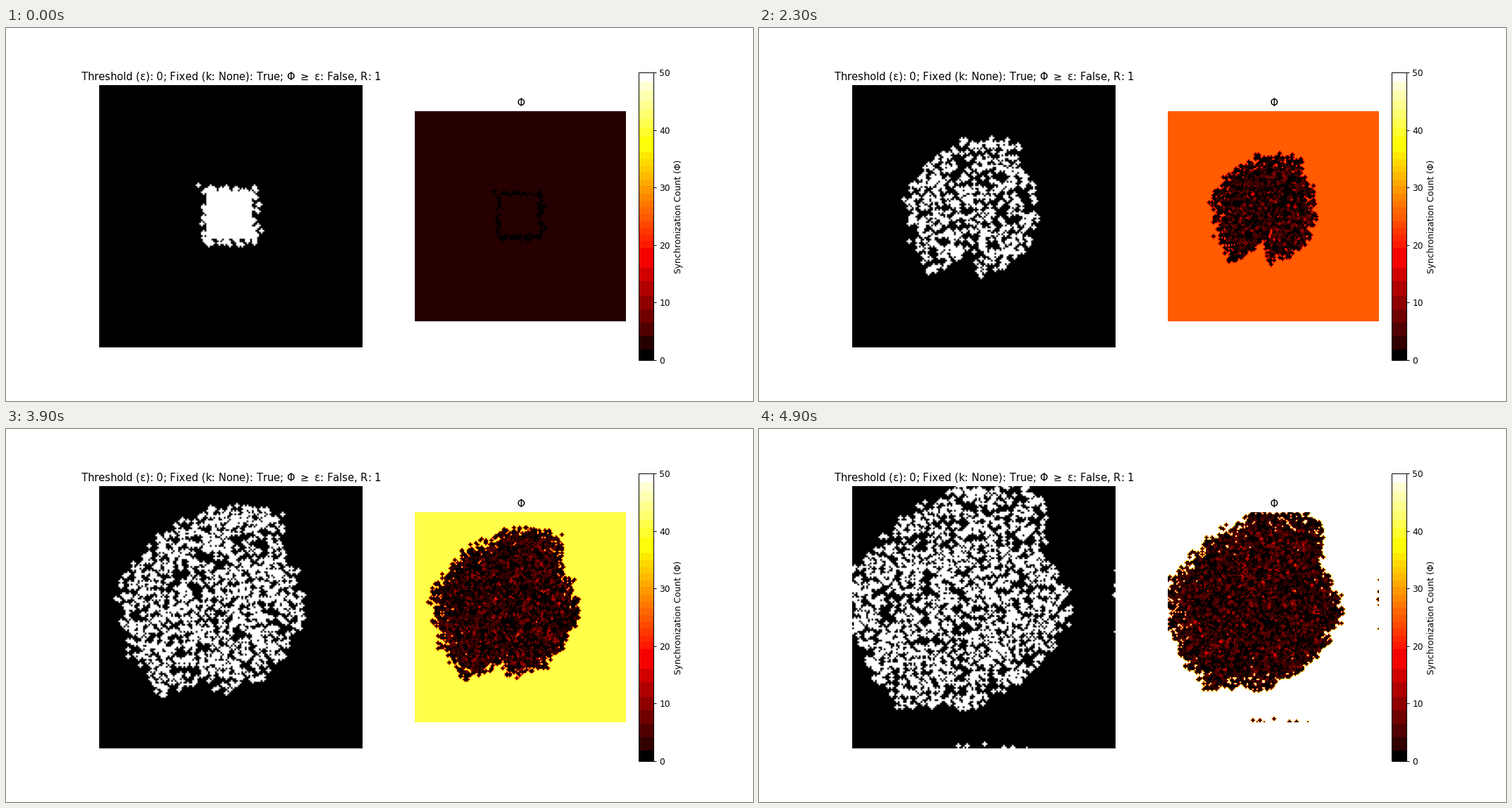
A matplotlib script for the animation above (5 s loop, 1058x529 px).

```python
import numpy as np
import matplotlib
import matplotlib.pyplot as plt
from matplotlib.animation import FuncAnimation
from matplotlib.colors import ListedColormap

FRAMES, N, VMAX = 50, 150, 50
SIZE = 372.7

# Growth speed of the colony by direction (degrees clockwise from right)
SPEED = {0: 1.6, 45: 1.0, 90: 1.7, 160: 2.8, 200: 3.1,
         225: 2.5, 270: 3.1, 295: 3.0, 315: 1.35, 340: 1.65}

axis = ((np.arange(N) + 0.5) / N - 0.5) * SIZE
X, Y = np.meshgrid(axis, axis)
HOT = matplotlib.colormaps["hot"](np.arange(256))[:, :3]


def radius(theta, n):
    """Outline: a square that grows, with ragged lobes and a closing notch."""
    a = np.radians(theta)
    base = 40 / np.maximum(abs(np.cos(a)), abs(np.sin(a)))
    grown = n * np.interp(theta, list(SPEED), list(SPEED.values()), period=360)
    lobes = sum(np.sin(k * a + k * k) for k in (11, 17, 26, 37))
    notch = 45 * np.sin(np.pi * n / FRAMES) * np.exp(-((theta - 113) / 11) ** 2)
    return base + grown + lobes * min(n / 8, 2) - notch


def colony(n, edge):
    """Cells the activity has reached, wrapping around the borders."""
    mask = np.zeros((N, N), bool)
    for sx, sy in ((0, 0), (SIZE, 0), (0, SIZE)):
        x, y = X - sx, Y - sy
        theta = np.degrees(np.arctan2(y, x)) % 360
        mask |= np.hypot(x, y) + edge < radius(theta, n)
    return mask


def plus(seeds):
    out = seeds.copy()
    for ax in (0, 1):
        for step in (-1, 1):
            out |= np.roll(seeds, step, ax)
    return out


def square(half):
    return np.maximum(abs(X + 2), abs(Y + 1)) < half


def background(n):
    """Count of the untouched cells, refreshed every second step."""
    return max(2, (n + 1) // 2 * 2 + 1)


def simulate():
    rng = np.random.default_rng(7)
    edge = rng.normal(0, 3, (N, N))
    state = square(37)
    last = np.full((N, N), -1)
    noise = rng.random((N, N))
    cells, counts = [], []
    for n in range(FRAMES):
        renew = rng.random((N, N)) < 0.42
        noise = np.where(renew, rng.random((N, N)), noise)
        density = 0.15 + 0.08 * np.exp(-n / 3)
        new = plus((noise < density) & colony(n, edge))
        new |= square(33 - 2.7 * n)
        last[new != state] = n
        state = new
        cells.append(state.astype(float))
        counts.append(np.where(last < 0, background(n), n - last).astype(float))
    return cells, counts


def palette(value):
    """Hot colormap in coarse colour steps, exact at the given value."""
    r, g, b = (HOT * 255).astype(int).T
    key = (r >> 5) * 256 + (g >> 4) * 16 + (b >> 5)
    lut = HOT.copy()
    for k in np.unique(key):
        lut[key == k] = HOT[key == k].mean(axis=0)
    i = min(int(value / VMAX * 256), 255)
    lut[key == key[i]] = HOT[i]
    lut[key == key[0]] = 0
    lut[key == key[-1]] = 1
    return ListedColormap(lut)


cells, counts = simulate()

plt.rcParams["font.family"] = "DejaVu Sans"
fig, (left, right) = plt.subplots(1, 2, figsize=(12, 6), dpi=1058 / 12)
world = left.imshow(cells[0], cmap="gray", vmin=0, vmax=1)
left.set_title(r"Threshold (ε): 0; Fixed (k: None): True; Φ $\geq$ ε: False, R: 1")
left.axis("off")

phi = right.imshow(counts[0], cmap=palette(background(0)), vmin=0, vmax=VMAX)
right.set_title("Φ")
right.axis("off")
fig.colorbar(phi, ax=right, label="Synchronization Count (Φ)")


def update(n):
    world.set_data(cells[n])
    phi.set_data(counts[n])
    phi.set_cmap(palette(background(n)))
    return world, phi


anim = FuncAnimation(fig, update, frames=FRAMES, interval=100,
                     repeat=True, repeat_delay=0, blit=False)
plt.show()
```
